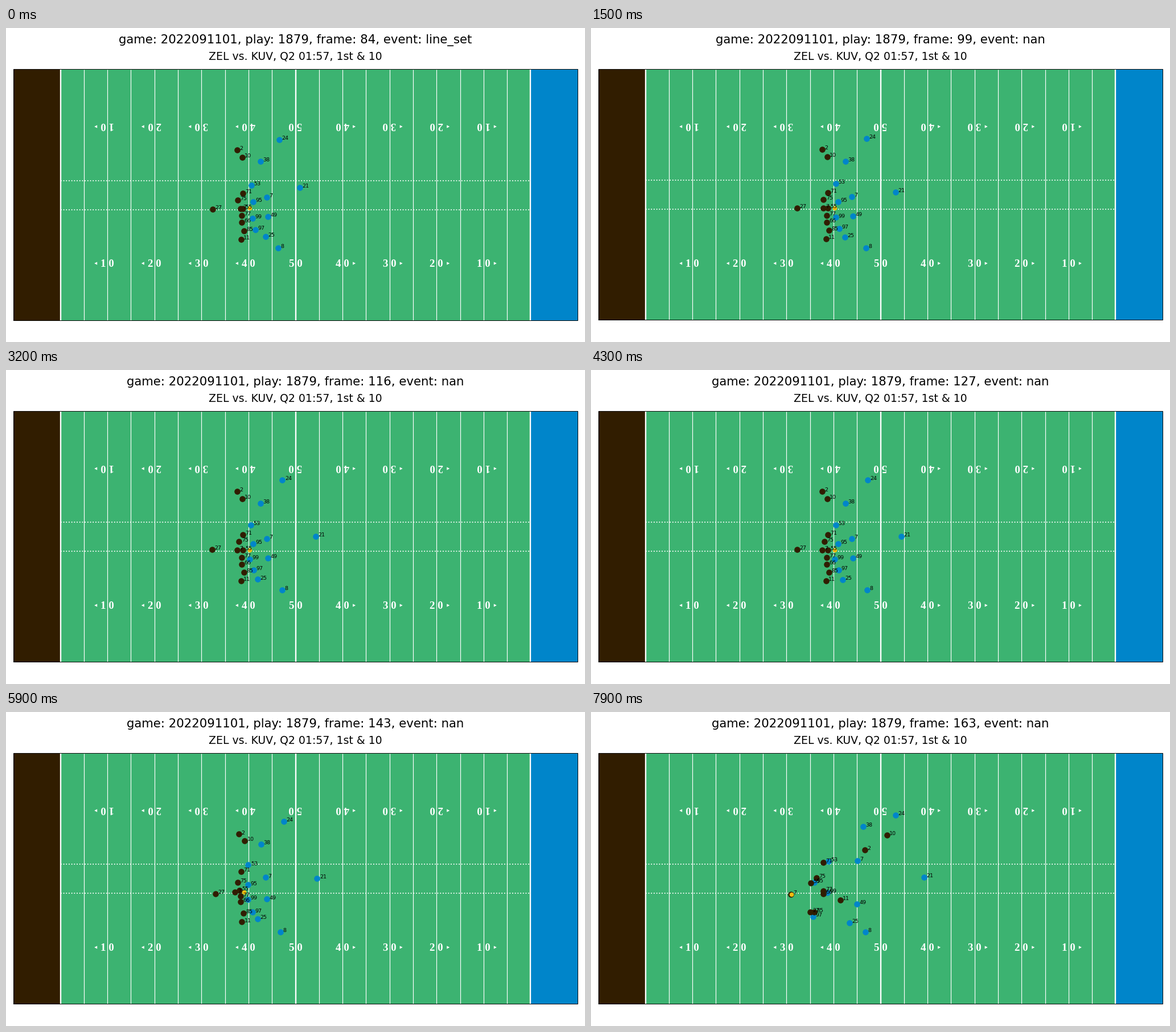
A matplotlib script for the animation above (8000 ms loop, 1017 by 551 pixels).

```python
import numpy as np
import matplotlib.pyplot as plt
from matplotlib.animation import FuncAnimation
from matplotlib.patches import Polygon, Rectangle

W, H, DPI = 1017, 551, 72          # at 72 dpi one point is one pixel
FRAMES, STEP = 80, 100
FIRST = 84
EVENTS = {84: "line_set", 138: "ball_snap", 152: "play_action"}
SETTLE, SNAP, CATCH = 36, 54, 12   # frames: shifting done, snap, ball to passer

BROWN, BLUE, GRASS, GOLD = "#311d00", "#0085ca", "#3cb371", "#f0bc10"
YARD = 8.258
TOP, BOTTOM = 72.5, 512.5
HASHES = (266.5, 317.5)
PT = 85 / 72                       # pixels per point of lettering and lines


def yard_x(yard):
    return W / 2 + YARD * (yard - 60)


class Player:
    """Shifts into a spot, waits for the snap, then runs to an end point.

    pace > 1 starts slowly, pace < 1 bursts off the line;
    bend bows the run sideways.
    """

    def __init__(self, number, spot, end, pace, shift=(0, 0), bend=(0, 0)):
        self.number, self.pace = number, pace
        self.spot, self.end, self.shift, self.bend = map(
            np.array, (spot, end, shift, bend))

    def at(self, i):
        early = 1 - min(i / SETTLE, 1)
        s = max(i - SNAP, 0) / (FRAMES - 1 - SNAP)
        return (self.spot + self.shift * early ** 2
                + (self.end - self.spot) * s ** self.pace
                + self.bend * np.sin(np.pi * s) ** 2)


BURST, STEADY, LATE = 0.65, 1, 1.9

passer = Player(7, (406, 316), (351, 320), 1.7, shift=(6, 0))
home = [
    Player(2, (405.5, 213), (481, 242), LATE),
    Player(10, (414.5, 226), (519.5, 215.5), LATE),
    Player(71, (416, 289), (407.5, 263.5), BURST),
    Player(75, (409.5, 301), (395.5, 290.5), STEADY, shift=(-3, 0)),
    Player(55, (416, 316), (385.5, 300), STEADY),
    passer,
    Player(27, (362, 315), (385, 350.5), STEADY, shift=(1, 2), bend=(4, -10)),
    Player(77, (414, 328.5), (407.5, 314), BURST),
    Player(66, (414, 340.5), (407.5, 319), BURST),
    Player(85, (417.5, 355), (391.5, 351), LATE, bend=(3, -5)),
    Player(11, (413, 370), (438, 330), LATE),
]
away = [
    Player(24, (485.5, 192.5), (535, 181), LATE, shift=(-5.5, 3)),
    Player(38, (446.5, 233.5), (478, 201), LATE),
    Player(53, (430, 272), (417, 262), BURST, shift=(1, 3)),
    Player(21, (544.5, 292), (585, 290), LATE, shift=(-29, -13)),
    Player(7, (457.5, 296), (467.5, 260.5), STEADY, bend=(-11, 4)),
    Player(95, (433.5, 304.5), (391.5, 299), STEADY),
    Player(99, (428, 331.5), (415, 316.5), STEADY, shift=(5, 2)),
    Player(49, (460, 330), (467, 337), STEADY, bend=(-9, -9)),
    Player(97, (435, 351), (389.5, 359), LATE, shift=(3, 2)),
    Player(25, (441.5, 367.5), (454, 369.5), STEADY, shift=(14, -2), bend=(-7, -14)),
    Player(8, (485, 385.5), (482, 385.5), STEADY, shift=(-7, 0), bend=(-6, 0)),
]


def ball_at(i):
    spot = np.array([428, 315.5])
    return spot + (passer.at(i) + (0.5, 0.4) - spot) * np.clip((i - SNAP) / CATCH, 0, 1)


fig = plt.figure(figsize=(W / DPI, H / DPI), dpi=DPI, facecolor="white")
ax = fig.add_axes([0, 0, 1, 1])
ax.set(xlim=(0, W), ylim=(H, 0))
ax.axis("off")

# Field
for start, end, color in ((0, 10, BROWN), (10, 110, GRASS), (110, 120, BLUE)):
    ax.add_patch(Rectangle((yard_x(start), TOP), YARD * (end - start),
                           BOTTOM + 2 - TOP, fc=color, lw=0, zorder=0))
for yard in range(10, 111, 5):
    heavy = yard in (10, 60, 110)
    ax.plot([yard_x(yard)] * 2, [TOP, BOTTOM + 2], color="white",
            lw=PT * (2 if heavy else 1), solid_capstyle="butt", zorder=1)
hash_lines = [ax.plot([yard_x(10), yard_x(110)], [y, y], color="white",
                      lw=1.5 * PT, ls=":", zorder=1)[0] for y in HASHES]
margin = ax.add_patch(Rectangle((0, BOTTOM), W, H - BOTTOM, fc="white", lw=0,
                                zorder=2))
border = ax.add_patch(Rectangle((13.5, TOP), 991, BOTTOM - TOP, fill=False,
                                ec="black", lw=0.8 * PT, snap=False, zorder=2.5))

# Yard numbers
for yard in range(20, 101, 10):
    x = yard_x(yard)
    value = " ".join(str(min(yard, 120 - yard) - 10))
    for y, angle in ((165.6, 180), (419.2, 0)):
        ax.text(x, y, value, color="white", family="Liberation Serif",
                weight="bold", size=16 * PT, ha="center", va="baseline",
                rotation=angle, rotation_mode="anchor", zorder=2)
    if yard != 60:
        side = -1 if yard < 60 else 1
        for y in (173, 413):
            ax.add_patch(Polygon([(x + side * 23, y), (x + side * 18, y - 2.6),
                                  (x + side * 18, y + 2.6)], fc="white", lw=0,
                                 zorder=2))


def headline(y, size, text=""):
    return ax.text(W / 2 - 0.3, y, text, size=size * PT, ha="center",
                   va="baseline", family="DejaVu Sans")


heading = headline(27, 18)
headline(55.4, 16, "ZEL vs. KUV, Q2 01:57, 1st & 10")


def dots(size, color, z):
    return ax.scatter([], [], s=size ** 2, c=color, lw=0, zorder=z)


away_dots, home_dots = dots(10.6, BLUE, 3), dots(10.6, BROWN, 4)
ball = dots(7.6, GOLD, 5)
labels = [ax.text(0, 0, str(p.number), size=8 * PT, family="DejaVu Sans", zorder=6)
          for p in home + away]


def draw(i):
    number = FIRST + i
    event = EVENTS.get(number, "nan")
    heading.set_text(f"game: 2022091101, play: 1879, frame: {number}, event: {event}")

    # An underscore in the heading pushes the field down slightly.
    low = "_" in event
    margin.set_y(BOTTOM + low)
    border.set_height(BOTTOM + low - TOP)
    for line, y in zip(hash_lines, HASHES):
        line.set_ydata([y + low, y + low])

    spots = np.array([p.at(i) for p in home + away]) + (0, 0.5 * low)
    home_dots.set_offsets(spots[:len(home)])
    away_dots.set_offsets(spots[len(home):])
    ball.set_offsets([ball_at(i) + (0, 0.5 * low)])
    for label, spot in zip(labels, spots):
        label.set_position(spot + (4.4, 0.4))
    return []


anim = FuncAnimation(fig, draw, frames=FRAMES, interval=STEP, repeat=True,
                     repeat_delay=0, blit=False)
plt.show()
```
